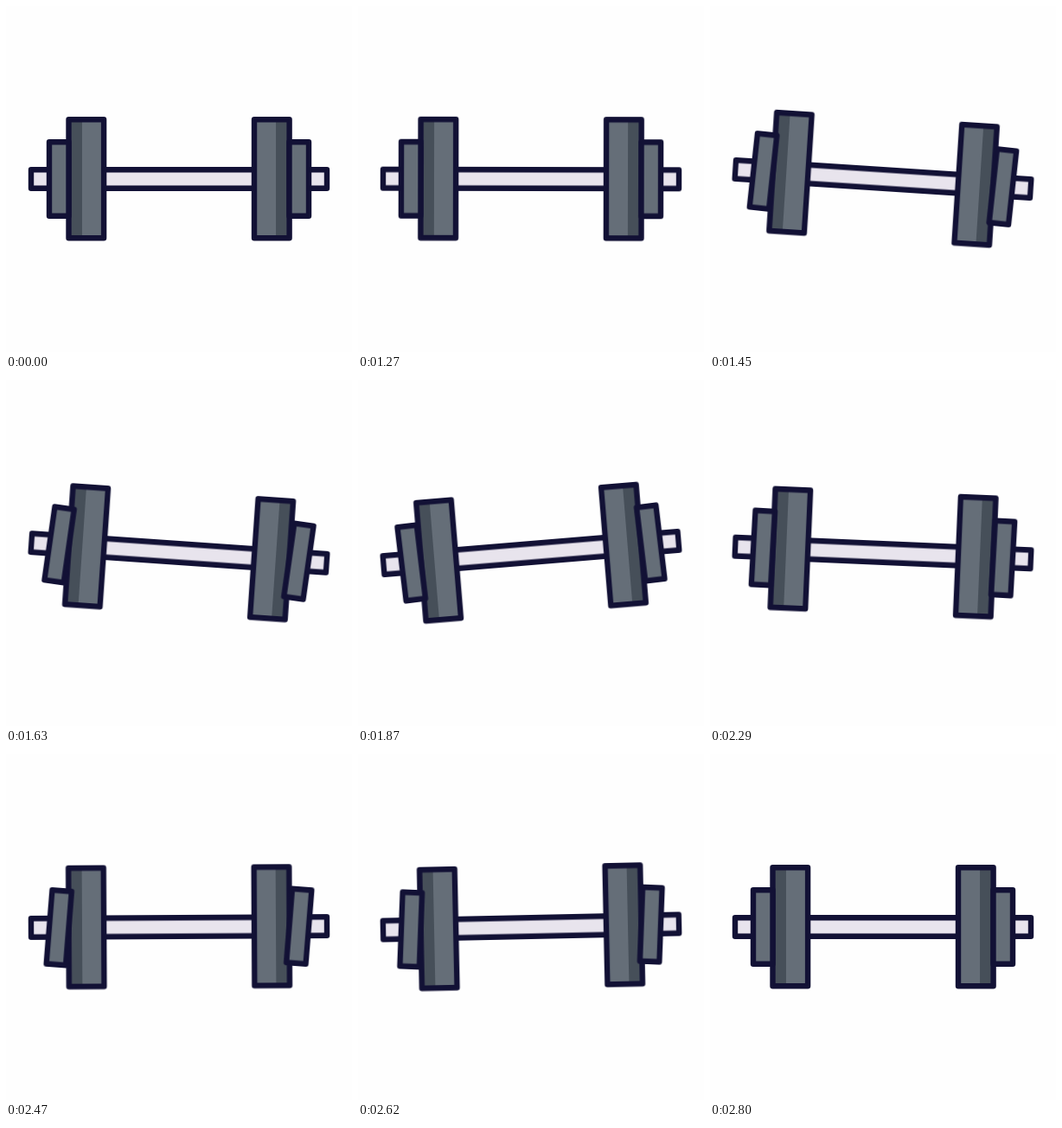
These frames come from a looping animation (400 by 400 pixels, 2830 ms). An HTML page:

```html
<!DOCTYPE html>
<html lang="en">
<head>
<meta charset="utf-8">
<title>Dumbbell</title>
<style>
  html, body { margin: 0; width: 100%; height: 100%; overflow: hidden; background: #fefefe; }
  svg { display: block; width: 100%; height: 100%; }
  rect { stroke-linejoin: round; }
  .line { stroke: #121135; stroke-width: 6.4; }
  .bar { fill: #e8e4ed; }
  .plate { fill: #656e78; }
  .shade { fill: #464f59; }
  #bell { transform-origin: 200px 200px; }
  .small { transform-box: fill-box; transform-origin: center; }
</style>
</head>
<body>
<svg viewBox="0 0 400 400">
  <g id="bell">
    <rect class="bar line" x="29" y="189.2" width="342" height="21.6"/>

    <rect class="plate" x="72.5" y="131.3" width="40.6" height="137"/>
    <rect class="shade" x="72.5" y="131.3" width="15.5" height="137"/>
    <rect class="line" fill="none" x="72.5" y="131.3" width="40.6" height="137"/>

    <rect class="plate" x="287" y="131.3" width="40.6" height="137"/>
    <rect class="shade" x="312" y="131.3" width="15.5" height="137"/>
    <rect class="line" fill="none" x="287" y="131.3" width="40.6" height="137"/>

    <rect class="small plate line" x="50" y="157.2" width="22.5" height="85.6"/>
    <rect class="small plate line" x="327.5" y="157.2" width="22.5" height="85.6"/>
  </g>
</svg>
<script>
  const LOOP = 2830;
  const SINE = 'cubic-bezier(.37,0,.63,1)';

  // steps: [time in ms, angle in degrees, easing towards the next step]
  function swing(el, steps) {
    const frames = steps.map(([time, angle, easing = SINE]) => ({
      offset: time / LOOP,
      transform: `rotate(${angle}deg)`,
      easing
    }));
    el.animate(frames, { duration: LOOP, iterations: Infinity });
  }

  swing(document.getElementById('bell'), [
    [0, 0], [1240, 0], [1560, 5],
    [1895, -4.85, 'cubic-bezier(.45,0,.8,.95)'],
    [2355, 3.5], [2530, -1.6], [2800, 0], [LOOP, 0]
  ]);

  // The outer plates lag behind the bar.
  for (const plate of document.querySelectorAll('.small')) {
    swing(plate, [
      [0, 0], [1260, 0], [1605, 4.2], [2035, -5],
      [2505, 5], [2800, 0], [LOOP, 0]
    ]);
  }
</script>
</body>
</html>
```
